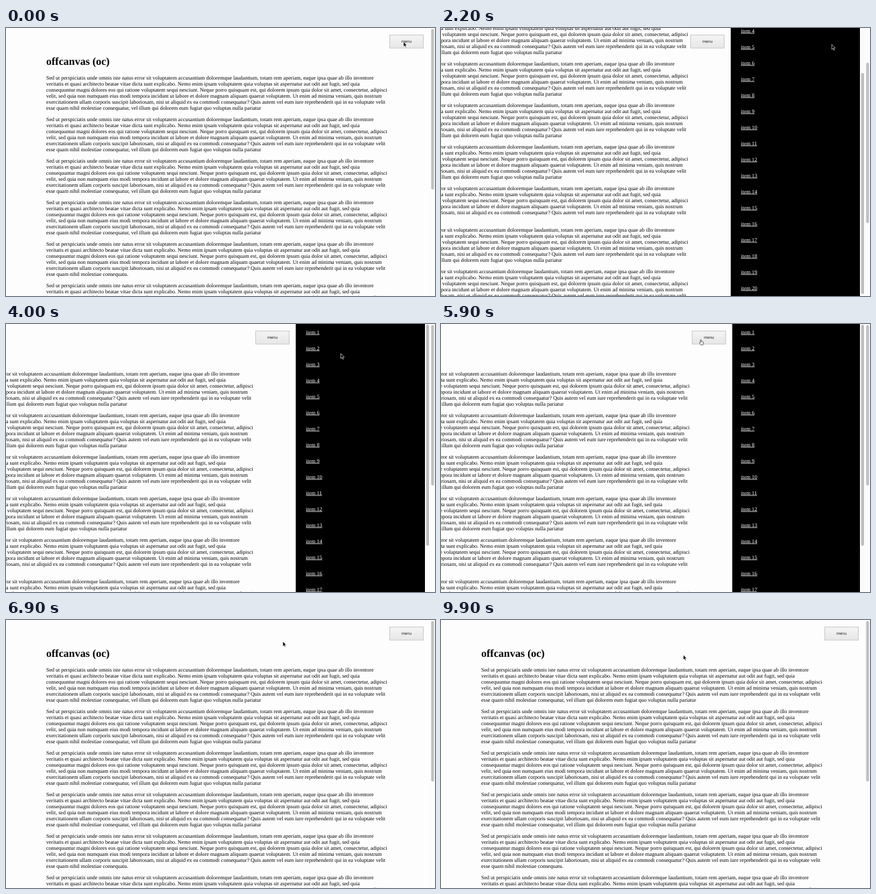
An HTML page that plays this animation: 640x400 px, repeating every 10000 ms.

```html
<!DOCTYPE html>
<html lang="en">
<head>
<meta charset="utf-8">
<title>offcanvas</title>
<style>
html, body { margin: 0; width: 100%; height: 100%; overflow: hidden; background: #fdfdfd; }
svg { display: block; width: 100%; height: 100%; }
text { font: 8px "Liberation Serif", "Times New Roman", serif; text-rendering: geometricPrecision; white-space: pre; }
.title { font-size: 16px; font-weight: bold; }
.link { fill: #fff; text-decoration: underline; }
.label { font: 6px "Liberation Sans", Arial, sans-serif; text-anchor: middle; fill: #222; }
</style>
</head>
<body>
<svg viewBox="0 0 640 400">
  <defs>
    <linearGradient id="face" x2="0" y2="1">
      <stop offset="0" stop-color="#f4f4f4"/><stop offset="1" stop-color="#e7e7e7"/>
    </linearGradient>
    <linearGradient id="pressed" x2="0" y2="1">
      <stop offset="0" stop-color="#dcdcdc"/><stop offset="1" stop-color="#eee"/>
    </linearGradient>
  </defs>
  <rect x="432" width="200" height="400"/>
  <g id="items"></g>
  <rect x="625" width="7.5" height="400" fill="#fafafa"/>
  <rect id="panelThumb" x="626.8" width="4.2" height="330" rx="2.1" fill="#bdbdbd"/>
  <g id="page">
    <rect width="632.3" height="400" fill="#fdfdfd"/>
    <g id="content"><text class="title" x="60" y="55">offcanvas (oc)</text></g>
    <rect id="button" x="572.5" y="10.5" width="50" height="19.5" stroke="#c9c9c9"/>
    <text class="label" x="597.5" y="22.2">menu</text>
  </g>
  <rect x="632.3" width="7.7" height="400" fill="#fcfcfc"/>
  <rect id="pageThumb" x="634.3" width="4.2" height="239.5" rx="2.1" fill="#bfbfbf"/>
  <g id="cursor" stroke-linejoin="round">
    <path id="arrow" d="M0 0V7.4L1.7 5.9L2.9 8.6L4.1 8.1L2.9 5.4H5.2Z" fill="#000" stroke="#fff" stroke-width=".6"/>
    <path id="hand" d="M1.6 4.6V.8Q2.1 0 2.7 .8V3.2Q3.4 2.8 3.8 3.4Q4.5 3 4.9 3.7Q5.8 3.4 6 4.4V6L5.2 8.2H2.2L.3 5.4Q0 4.4 .9 4.5Z" fill="#fff" stroke="#000" stroke-width=".6"/>
    <path id="beam" d="M-1.6 -4Q0 -4 0 -3Q0 -4 1.6 -4M0 -3V3M-1.6 4Q0 4 0 3Q0 4 1.6 4M-.8 1.5H.8" fill="none" stroke="#222" stroke-width=".8"/>
  </g>
</svg>
<script>
const LOOP = 10000, STEP = 100, PANEL_MAX = 80, PAGE_MAX = 256;
const $ = id => document.getElementById(id);

const lines = [
  "Sed ut perspiciatis unde omnis iste natus error sit voluptatem accusantium doloremque laudantium, totam rem aperiam, eaque ipsa quae ab illo inventore",
  "veritatis et quasi architecto beatae vitae dicta sunt explicabo. Nemo enim ipsam voluptatem quia voluptas sit aspernatur aut odit aut fugit, sed quia",
  "consequuntur magni dolores eos qui ratione voluptatem sequi nesciunt. Neque porro quisquam est, qui dolorem ipsum quia dolor sit amet, consectetur, adipisci",
  "velit, sed quia non numquam eius modi tempora incidunt ut labore et dolore magnam aliquam quaerat voluptatem. Ut enim ad minima veniam, quis nostrum",
  "exercitationem ullam corporis suscipit laboriosam, nisi ut aliquid ex ea commodi consequatur? Quis autem vel eum iure reprehenderit qui in ea voluptate velit"
];
const longEnd = "esse quam nihil molestiae consequatur, vel illum qui dolorem eum fugiat quo voluptas nulla pariatur";
const shortEnd = "esse quam nihil molestiae consequatu.";

function addText(parent, x, y, str, cls) {
  const el = document.createElementNS("http://www.w3.org/2000/svg", "text");
  el.setAttribute("x", x);
  el.setAttribute("y", y);
  if (cls) el.setAttribute("class", cls);
  el.textContent = str;
  parent.append(el);
}

for (let p = 0; p < 9; p++) {
  const end = p >= 4 && p % 2 === 0 ? shortEnd : longEnd;
  [...lines, end].forEach((str, i) => addText($("content"), 60, 77 + p * 62 + i * 9, str));
}
for (let i = 0; i < 20; i++) addText($("items"), 447.5, 14.5 + i * 24, "item " + (i + 1), "link");

const clamp = v => Math.min(1, Math.max(0, v));
const span = (t, a, b) => clamp((t - a) / (b - a));
const smooth = u => u < .5 ? 4 * u ** 3 : 1 - 4 * (1 - u) ** 3;
const easeOut = u => 1 - (1 - u) ** 2;

// CSS "ease": cubic-bezier(.25, .1, .25, 1)
function ease(x) {
  const bez = (a, b, s) => 3 * a * s * (1 - s) ** 2 + 3 * b * s * s * (1 - s) + s ** 3;
  let lo = 0, hi = 1;
  for (let i = 0; i < 24; i++) {
    const mid = (lo + hi) / 2;
    if (bez(.25, .25, mid) < x) lo = mid; else hi = mid;
  }
  return bez(.1, 1, lo);
}

// time, x, y, shape
const path = [
  [0, 593, 20.5, "arrow"], [100, 593, 20.5, "hand"], [700, 593, 20.5, "arrow"],
  [1300, 583, 24.5, "arrow"], [3400, 583, 24.5, "arrow"], [4000, 499.5, 44, "arrow"],
  [4100, 489, 60, "arrow"], [4300, 300, 150, "beam"], [4400, 203, 203, "beam"],
  [4500, 203, 203, "beam"], [4800, 70, 310, "beam"], [5000, 12, 348, "arrow"],
  [5200, 240, 300, "beam"], [5350, 430, 190, "arrow"], [5600, 385.5, 23, "hand"],
  [5900, 385.5, 23, "hand"], [6100, 385.5, 23, "arrow"], [6900, 413, 32, "arrow"],
  [7400, 414, 33.5, "beam"], [8600, 413, 33.5, "arrow"], [8700, 413, 33.5, "arrow"],
  [9300, 408, 50, "arrow"], [9400, 408, 50, "arrow"], [9900, 361.5, 52, "arrow"],
  [LOOP, 361.5, 52, "arrow"]
];

function cursorAt(t) {
  const i = path.findIndex(k => k[0] > t) - 1;
  const [t0, x0, y0, shape] = path[i], [t1, x1, y1] = path[i + 1];
  const u = span(t, t0, t1);
  return { x: x0 + (x1 - x0) * u, y: y0 + (y1 - y0) * u, shape };
}

const move = (id, x, y) => $(id).setAttribute("transform", `translate(${x} ${y})`);

function draw(t) {
  const shift = 200 * (ease(span(t, 485, 1185)) - ease(span(t, 5885, 6585)));
  const panel = PANEL_MAX * (easeOut(span(t, 1300, 1800)) - smooth(span(t, 3050, 3500)));
  const chained = easeOut(span(t, 2070, 2805));
  const settle = t < 2600 ? chained : easeOut(span(2600, 2070, 2805));
  const page = PAGE_MAX * (settle * (1 - smooth(span(t, 3400, 3950)))
    + smooth(span(t, 6950, 7400)) - smooth(span(t, 7780, 8220)));

  move("page", -shift, 0);
  move("content", 0, -page);
  move("items", 0, -panel);
  move("panelThumb", 0, 1 + panel * 66 / PANEL_MAX);
  move("pageThumb", 0, 1.5 + page * 156 / PAGE_MAX);

  const down = (t >= 200 && t < 400) || (t >= 5700 && t < 5900);
  $("button").setAttribute("fill", down ? "url(#pressed)" : "url(#face)");

  const c = cursorAt(t);
  move("cursor", c.x, c.y);
  for (const id of ["arrow", "hand", "beam"]) $(id).style.display = id === c.shape ? "" : "none";
}

const start = performance.now();
function tick() {
  const t = (performance.now() - start) % LOOP;
  draw(Math.floor(t / STEP) * STEP);
  requestAnimationFrame(tick);
}
tick();
</script>
</body>
</html>
```
